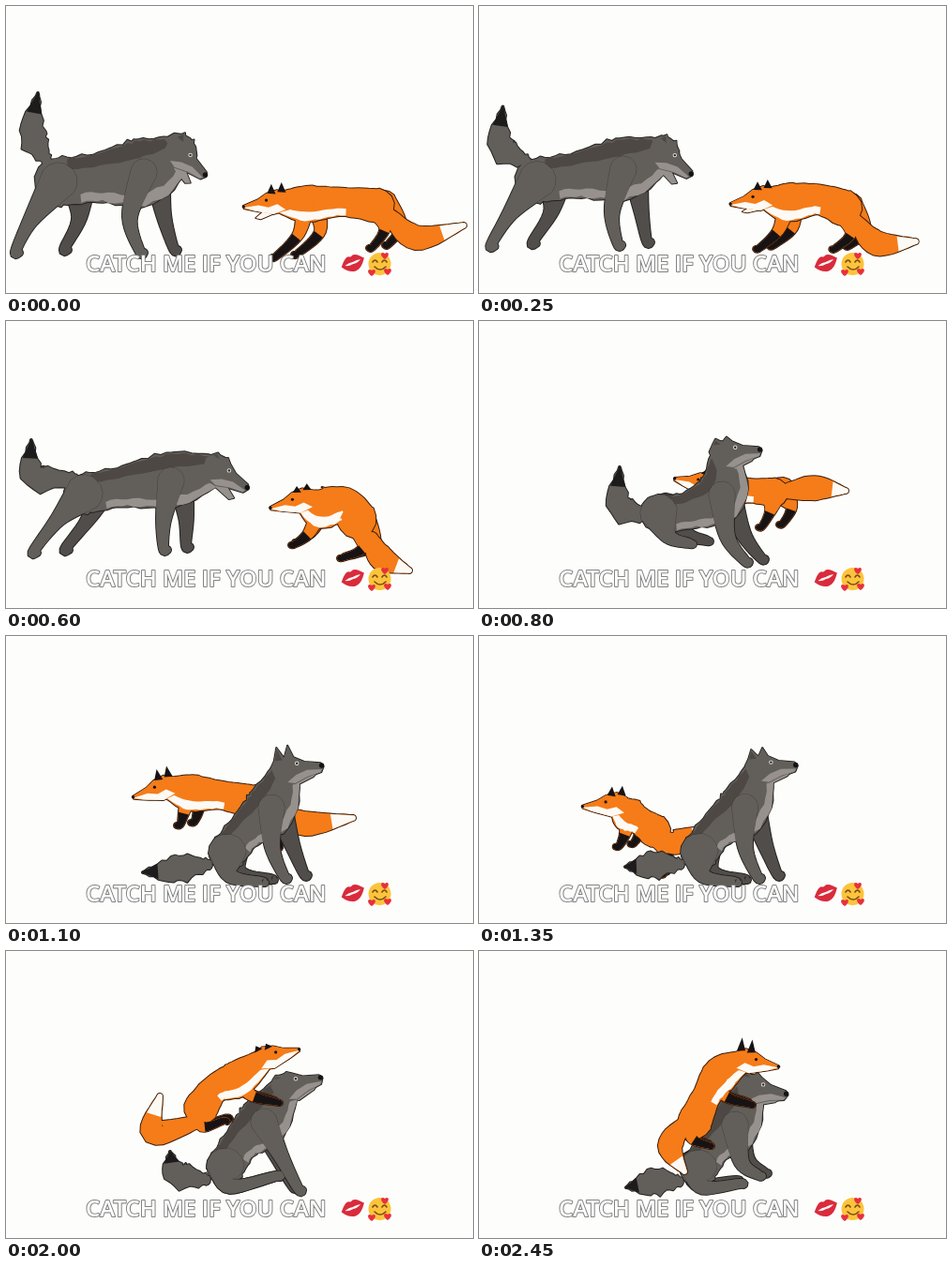
These frames come from a looping animation (498x306 px, 2.5 s). An HTML page with a canvas:

```html
<!DOCTYPE html>
<html lang="en">
<head>
<meta charset="utf-8">
<title>Catch me if you can</title>
<style>
html, body { margin: 0; width: 100%; height: 100%; overflow: hidden; background: #fdfefc; }
canvas, svg { position: absolute; left: 0; top: 0; width: 498px; height: 306px; }
text { font: 600 24px "Open Sans", "Noto Sans", sans-serif; fill: #fff; stroke: #828282; stroke-width: 2px; stroke-linejoin: round; paint-order: stroke; }
</style>
</head>
<body>
<canvas id="stage" width="498" height="306"></canvas>
<svg viewBox="0 0 498 306">
  <defs><path id="heart" d="M0 4C-7-1-3-5 0-2C3-5 7-1 0 4Z" fill="#e8303c"/></defs>
  <text x="85" y="283">CATCH ME IF YOU CAN</text>
  <g transform="translate(370 274) rotate(-20)">
    <path d="M-13 0C-9-5-5-9-2-8Q0-6 2-8C6-9 10-4 13-1C9 5 5 9 0 9C-6 9-10 4-13 0Z" fill="#d92b3c"/>
    <path d="M-9 0Q-4-2 0-1Q5-2 9-1Q4 2 0 1Q-5 2-9 0Z" fill="#fdf4f4"/>
  </g>
  <circle cx="398.5" cy="275" r="12" fill="#fcc43c"/>
  <path d="M391 273q2.5-4 5 0M401 273q2.5-4 5 0M393 278q6 6 12 0" fill="none" stroke="#7a4a18" stroke-width="1.6" stroke-linecap="round"/>
  <use href="#heart" x="390" y="284"/><use href="#heart" x="407" y="283"/><use href="#heart" x="404" y="266"/>
</svg>
<script>
const ctx = document.getElementById('stage').getContext('2d');
const LOOP = 2500, STEP = 50, TURN = 1450;

const mix = (a, b, u) => Array.isArray(a) ? a.map((v, i) => mix(v, b[i], u)) : a + (b - a) * u;
const noise = n => Math.abs(Math.sin(n * 127.1) * 43758.5) % 1;
const points = text => text.split(' ').map(s => s.split(',').map(Number));

// Each pose keeps whatever it does not restate. legs: hind joint, hind paw, fore joint, fore paw.
// gap: how far the far hind and far fore legs stand from the near ones.
function poses(...list) {
  let last = {};
  return list.map(({ shift, ...given }) => {
    const pose = { ...last };
    for (const [name, v] of Object.entries(given)) pose[name] = typeof v === 'string' ? points(v) : v;
    if (shift) for (const name of ['spine', 'tail', 'legs'])
      pose[name] = pose[name].map(([x, y]) => [x + shift[0], y + shift[1]]);
    return last = pose;
  });
}

// spine: rump, middle, shoulder, head
const wolf = poses(
  { t: 100, face: 1, bulk: 1.12, tilt: 42, ear: .6, jaw: 10, gap: [52, 36],
    spine: '56,187 95,183 147,177 183,156', tail: '42,163 28,138 34,93',
    legs: '26,229 10,262 132,225 143,262' },
  { t: 450, bulk: .92, tilt: 32, ear: .3, gap: [34, 24],
    spine: '70,184 108,177 163,170 211,159', tail: '58,168 17,166 14,127',
    legs: '42,212 16,246 155,212 155,243' },
  { t: 600, shift: [13, 0] },
  { t: 800, bulk: .85, tilt: -6, ear: .4, jaw: 0, gap: [18, 17],
    spine: '192,205 222,202 259,185 262,143', tail: '178,207 150,198 150,156',
    legs: '203,230 224,237 265,230 284,256' },
  { t: 1100, ear: 1, gap: [10, 21],
    spine: '236,231 254,209 283,183 299,144', tail: '214,244 182,249 146,252',
    legs: '240,256 272,262 284,225 297,257' },
  { t: 1600, tilt: -3, ear: .4,
    spine: '234,230 250,207 284,182 301,141', tail: '212,243 185,241 166,240' },
  { t: 2000, tilt: -14, ear: .2, gap: [0, -6],
    spine: '234,230 250,205 275,182 299,146', tail: '212,244 182,238 175,214',
    legs: '240,251 288,240 293,218 312,254' },
  { t: 2450, tilt: 11, ear: .3, gap: [-4, 6],
    spine: '234,232 250,208 273,185 290,147', tail: '212,246 185,247 157,252',
    legs: '240,252 278,248 280,225 298,239' });

const fox = poses(
  { t: 100, face: -1, bulk: 1, tilt: 9, ear: .7, jaw: 8, gap: [17, 23],
    spine: '396,213 358,209 319,211 291,209', tail: '408,222 438,247 488,234',
    legs: '404,237 391,257 312,243 288,267' },
  { t: 450, bulk: 1.15, tilt: 14, ear: .4, jaw: 0, gap: [12, 4],
    spine: '380,219 367,203 342,207 325,199', tail: '396,240 407,261 436,274',
    legs: '387,249 366,260 329,234 314,246' },
  { t: 600, shift: [-6, -8] },
  { t: 800, bulk: .85, tilt: -9, gap: [22, 12],
    spine: '314,183 290,181 262,180 246,175', tail: '324,182 358,178 391,181',
    legs: '311,202 302,219 247,192 243,205' },
  { t: 1100, bulk: 1, tilt: 18, ear: .8, gap: [-8, 15],
    spine: '262,177 230,170 196,167 172,161', tail: '285,187 320,200 370,194',
    legs: '285,200 292,224 190,187 186,201' },
  { t: 1300, shift: [-45, 26] },
  { t: TURN, face: 1, bulk: .9, tilt: -24, ear: .4, gap: [28, 17],
    spine: '126,217 146,201 175,184 191,166', tail: '114,219 82,206 92,172',
    legs: '111,235 97,258 178,203 167,217' },
  { t: 1600, shift: [4, -14] },
  { t: 2000, bulk: 1, tilt: -14, ear: .3, gap: [3, -5],
    spine: '208,167 223,147 248,136 276,115', tail: '202,183 157,193 164,155',
    legs: '210,187 232,181 262,154 288,161' },
  { t: 2450, tilt: 11, ear: 1, gap: [-3, -4],
    spine: '230,182 243,154 259,131 282,117', tail: '221,182 204,208 219,235',
    legs: '228,200 244,207 262,154 288,163' });

function poseAt(list, t) {
  let i = 0;
  while (i < list.length - 2 && list[i + 1].t <= t) i++;
  const a = list[i], b = list[i + 1], u = Math.max(0, (t - a.t) / (b.t - a.t));
  const p = Object.fromEntries(Object.keys(a).map(name => [name, mix(a[name], b[name], u)]));
  p.face = Math.sign(p.face) || 1;
  return p;
}

// Smooth path of [x, y, radius] with rounded ends.
function limb(joints, radii) {
  const keys = joints.map((p, i) => [...p, radii[i]]), path = [], n = keys.length;
  for (let i = 0; i < n - 1; i++) {
    const [a, b, c, d] = [-1, 0, 1, 2].map(o => keys[Math.max(0, Math.min(n - 1, i + o))]);
    for (let u = 0; u < 1; u += 1 / 8)
      path.push(b.map((v, j) => v + u / 2 * (c[j] - a[j]
        + u * (2 * a[j] - 5 * v + 4 * c[j] - d[j] + u * (3 * v - a[j] - 3 * c[j] + d[j])))));
  }
  path.push(keys[n - 1]);
  return [...cap(path[0], path[1]).reverse(), ...path, ...cap(path[path.length - 1], path[path.length - 2])];
}
function cap([x, y, r], [fx, fy]) {
  const a = Math.atan2(y - fy, x - fx);
  return [.4, .75, .96].map(q => [x + Math.cos(a) * r * q, y + Math.sin(a) * r * q, r * Math.sqrt(1 - q * q)]);
}
// Area along a path between two fractions of its radius; fur roughens the edges.
function band(path, lo = -1, hi = 1, fur = 0) {
  const side = f => path.map(([x, y, r], i) => {
    const a = path[Math.max(0, i - 1)], b = path[Math.min(path.length - 1, i + 1)];
    const dir = Math.atan2(b[1] - a[1], b[0] - a[0]);
    const k = f * r * (1 + fur * (noise(i + f * 7) - .5));
    return [x - Math.sin(dir) * k, y + Math.cos(dir) * k];
  });
  return [...side(lo), ...side(hi).reverse()];
}

function trace(pts) {
  ctx.beginPath();
  pts.forEach(p => ctx.lineTo(...p));
  ctx.closePath();
}
function fill(pts, color) { trace(pts); ctx.fillStyle = color; ctx.fill(); }
function stroke(pts, color, width) { trace(pts); ctx.strokeStyle = color; ctx.lineWidth = width; ctx.stroke(); }
// One contour around overlapping parts.
function joined(parts, color, edge) {
  parts.forEach(p => stroke(p, edge, 2));
  parts.forEach(p => fill(p, color));
}
function dot([x, y], r, color) {
  ctx.beginPath();
  ctx.arc(x, y, r, 0, 7);
  ctx.fillStyle = color;
  ctx.fill();
}

function rig(p, size) {
  const [rump, , shoulder, head] = p.spine, [knee, hock, elbow, wrist] = p.legs;
  const leg = (root, joint, paw, radii, gap) => {
    const move = ([x, y], k) => [x + gap * k, y - (gap ? 3 * k : 0)];
    const end = move(paw, 1);
    return limb([move(root, .4), move(joint, 1), end, [end[0] + p.face * 4, end[1] + 1]], radii);
  };
  const a = p.tilt * Math.PI / 180, c = Math.cos(a), s = Math.sin(a);
  return {
    spine: limb(p.spine, size.spine.map(r => r * p.bulk)),
    tail: limb(p.tail, size.tail),
    hind: [0, p.gap[0]].map(g => leg(rump, knee, hock, size.hind, g)),
    fore: [0, p.gap[1]].map(g => leg(shoulder, elbow, wrist, size.fore, g)),
    // Head shapes look right, with the origin where head meets neck.
    place: text => points(text).map(([x, y]) => [head[0] + p.face * (x * c - y * s), head[1] + x * s + y * c]),
    side: (path, lo, hi, fur) => p.face > 0 ? band(path, lo, hi, fur) : band(path, -lo, -hi, fur)
  };
}

function drawWolf(p) {
  const edge = '#24211f', coat = '#625e5a', dark = '#4d4843', light = '#96918c';
  const r = rig(p, { spine: [23, 23, 32, 18], tail: [6, 14, 1], hind: [20, 8, 5, 4], fore: [14, 8, 5, 4] });
  const tip = -13 - 13 * p.ear;
  const skull = r.place(`-16,-5 -12,-12 -8,${tip} -1,-14 4,${tip - 1} 9,-14 20,-8 37,-5 40,-1 37,5 22,9 8,15 -10,15`);
  const jaw = r.place(`4,12 14,6 32,${5 + p.jaw} 28,${9 + p.jaw} 10,16`);
  const [hind, farHind] = r.hind.map(l => band(l)), [fore, farFore] = r.fore.map(l => band(l));
  const torso = band(r.spine, -1, 1, .14);
  joined([farHind, farFore], '#514d4a', edge);
  joined([band(r.tail, -1, 1, .5), torso, hind, fore, jaw, skull], coat, edge);
  fill(r.side(r.spine.slice(6, -4), -.95, -.45, .14), dark);
  fill(r.side(r.spine.slice(8, -3), .62, .96, .14), light);
  [hind, fore].forEach(l => { stroke(l, 'rgba(36,33,31,.5)', 1); fill(l, coat); });
  fill(band(r.tail.slice(15), -1, 1, .3), '#1d1b1b');
  fill(jaw, light);
  fill(skull, coat);
  fill(r.place('38,2 22,1 10,5 0,12 8,14 22,8 36,5'), light);
  fill(r.place(`-11,-12 -8,${tip + 2} -3,-12`), dark);
  const [eye] = r.place('12,-7'), [nose] = r.place('38,-2');
  dot(eye, 2.2, '#e2dfda');
  dot(eye, 1.2, edge);
  dot(nose, 2.7, '#151414');
}

function drawFox(p) {
  const edge = '#3a1c0c', coat = '#f57c18', black = '#171314', white = '#fdfaf6';
  const r = rig(p, { spine: [18, 15, 19, 11], tail: [7, 13, 3], hind: [15, 6, 3.5, 3], fore: [10, 6, 3.5, 3] });
  const tip = -12 - 12 * p.ear;
  const skull = r.place(`-10,-7 0,-13 12,-11 22,-6 38,-2 38,1 28,5 8,12 -10,10`);
  const jaw = r.place(`6,11 14,5 27,${5 + p.jaw} 22,${7 + p.jaw}`);
  const socks = legs => legs.map(l => band(l.slice(12)));
  const thigh = band(r.hind[0]), torso = band(r.spine, -1, 1, .05);
  joined([r.hind[1], r.fore[1]].map(l => band(l)), coat, edge);
  [...socks([r.hind[1], r.fore[1]])].forEach(s => fill(s, black));
  joined([band(r.tail, -1, 1, .06), torso, thigh, band(r.fore[0]), jaw, skull], coat, edge);
  fill(r.side(r.spine.slice(10), .45, .94, .1), white);
  fill(thigh, coat);
  [...socks([r.hind[0], r.fore[0]])].forEach(s => fill(s, black));
  fill(band(r.tail.slice(15), -.95, .95), white);
  fill(jaw, white);
  fill(skull, coat);
  fill(r.place('38,0 22,0 12,4 2,2 -6,9 8,12 28,5'), white);
  [-5, 6].forEach(x => fill(r.place(`${x - 4},-9 ${x - 1},${tip} ${x + 5},-11`), black));
  dot(r.place('13,-4')[0], 1.6, black);
  dot(r.place('38,-1')[0], 1.7, black);
}

function frame(now) {
  const t = Math.floor(Math.max(0, now - start) % LOOP / STEP) * STEP;
  const cast = [() => drawFox(poseAt(fox, t)), () => drawWolf(poseAt(wolf, t))];
  if (t >= TURN) cast.reverse();
  ctx.clearRect(0, 0, 498, 306);
  cast.forEach(draw => draw());
  requestAnimationFrame(frame);
}
ctx.lineJoin = 'round';
const start = performance.now();
frame(start);
</script>
</body>
</html>
```
